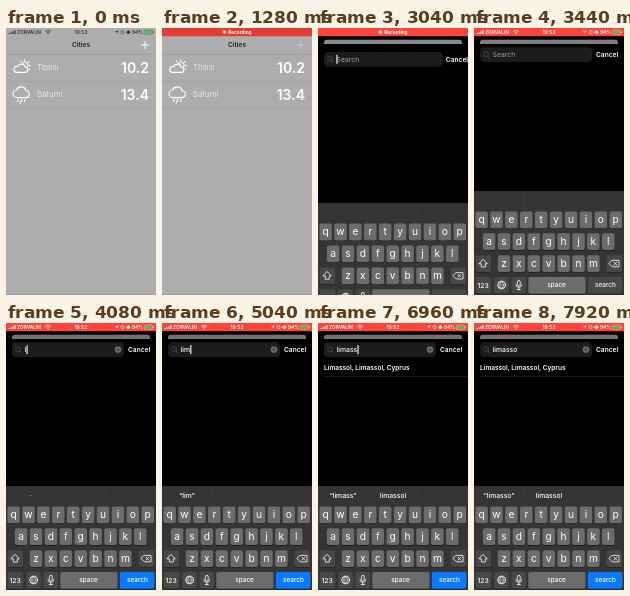
Recreate the animation shown at these times as an HTML page. Size 150 px wide and 267 px high, loop 8000 ms.

```html
<!DOCTYPE html>
<html lang="en">
<head>
<meta charset="utf-8">
<title>City search</title>
<style>
html, body { margin: 0; width: 100%; height: 100%; overflow: hidden; background: #000; }
svg { display: block; width: 100vw; height: 100vh; font: 500 6.8px Inter, Roboto, sans-serif; fill: #fff; }
.line { fill: none; stroke: #fff; stroke-linecap: round; stroke-linejoin: round; }
.mid { text-anchor: middle; }
.end { text-anchor: end; }
.city { font-size: 8px; font-weight: 300; fill: #f2f2f2; }
.temp { font-size: 14px; font-weight: 600; text-anchor: end; }
.rule { fill: #999; }
.small { font-size: 5px; font-weight: 600; }
.key { font-size: 10.2px; font-weight: 400; text-anchor: middle; }

#page, #paper, #dim, #plus, #sheet, #top, #field, #side, #keys, #red, #rec, #info {
  animation: 8s linear infinite;
}
#page { animation-name: recede; }
#paper { animation-name: corners; }
#dim { animation-name: corners, dim; }
#plus { animation-name: press; }
#sheet { animation-name: rise; }
#top { animation-name: lift; }
#field { animation-name: shrink; }
#side { animation-name: enter; }
#keys { animation-name: keys; }
#red { animation-name: red; animation-timing-function: step-end; }
#rec { animation-name: rec; animation-timing-function: step-end; }
#info { animation-name: info; animation-timing-function: step-end; }

@keyframes recede {
  0%, 17% { transform: none; animation-timing-function: cubic-bezier(.2,.8,.2,1); }
  24%, 100% { transform: translate(6px, 11.5px) scale(.92); }
}
@keyframes corners { 0%, 17% { rx: 0; } 20%, 100% { rx: 4px; } }
@keyframes dim { 0%, 17% { opacity: 0; } 24%, 32% { opacity: .12; } 48%, 100% { opacity: .34; } }
@keyframes press { 0%, 14% { opacity: 1; } 15%, 100% { opacity: .35; } }
@keyframes rise {
  0%, 17% { transform: translateY(253px); animation-timing-function: cubic-bezier(.2,.8,.2,1); }
  24%, 100% { transform: none; }
}
@keyframes lift {
  0%, 35% { transform: none; animation-timing-function: cubic-bezier(.33,.67,.67,1); }
  40.9%, 100% { transform: translateY(-19.4px); }
}
@keyframes shrink {
  0%, 35% { width: 138px; animation-timing-function: cubic-bezier(.33,.67,.67,1); }
  40.9%, 100% { width: 112px; }
}
@keyframes enter {
  0%, 35% { transform: translateX(50px); animation-timing-function: cubic-bezier(.33,1,.67,1); }
  40.9%, 100% { transform: none; }
}
@keyframes keys {
  0%, 35% { transform: translateY(104px); animation-timing-function: cubic-bezier(.33,1,.67,1); }
  40.9%, 100% { transform: none; }
}
@keyframes red { 0% { opacity: 0; fill: #e43c32; } 7% { opacity: 1; fill: #e43c32; } 20%, 100% { opacity: 1; fill: #ff453a; } }
@keyframes rec { 0% { opacity: 0; } 7% { opacity: 1; } 43%, 100% { opacity: 0; } }
@keyframes info { 0% { opacity: 1; color: #333; } 7% { opacity: 0; color: #fff; } 43%, 100% { opacity: 1; color: #fff; } }
</style>
</head>
<body>
<svg viewBox="0 0 150 267">
  <rect width="150" height="267" fill="#000"/>

  <g id="page">
    <rect id="paper" width="150" height="267" fill="#adadad"/>
    <text class="mid" x="75" y="19.4" font-weight="600" font-size="6.6" fill="#222">Cities</text>
    <path id="plus" class="line" d="M135.5 17h7M139 13.5v7"/>
    <rect class="rule" y="26" width="150" height=".6"/>
    <rect class="rule" y="52.8" width="150" height=".6"/>
    <rect class="rule" y="79.6" width="150" height=".6"/>
    <rect class="rule" y="266.2" width="150" height=".8"/>
    <g class="line" stroke-width="1.1">
      <path d="M10 44.4h9a2.6 2.6 0 0 0 .3-5.2A4 4 0 0 0 11.7 38.6A2.9 2.9 0 0 0 10 44.4z"/>
      <path d="M16.4 35.6a3 3 0 0 1 5.2 3.2M18.6 32.4v-.5M22.4 34l.6-.6M23.6 37.6h.8M15 33.7l-.5-.6M23 41l.5.4"/>
      <path d="M11 69.6h8.6a3.4 3.4 0 0 0 .5-6.8A5 5 0 0 0 10.6 62A3.8 3.8 0 0 0 11 69.6z"/>
      <path d="M12.4 71.6l-1 1.8M16 71.6l-2 3.6M19.4 71.6l-1 1.8"/>
    </g>
    <text class="city" x="31" y="42.4">Tbilisi</text>
    <text class="temp" x="143" y="45">10.2</text>
    <text class="city" x="31" y="69.2">Batumi</text>
    <text class="temp" x="143" y="71.8">13.4</text>
    <rect id="dim" width="150" height="267" fill="#000"/>
  </g>

  <g id="sheet">
    <path d="M0 267V19a3 3 0 0 1 3-3h144a3 3 0 0 1 3 3v248z" fill="#000"/>
    <g id="top">
      <rect id="field" x="6" y="38.7" width="138" height="14.6" rx="4" fill="#1c1c1e"/>
      <path class="line" d="M14 47.6l1.8 1.9M14.5 45.6a2.4 2.4 0 1 1-4.8 0a2.4 2.4 0 1 1 4.8 0z" stroke-width=".7" style="stroke:#525256"/>
      <text id="hint" x="18.6" y="48.5" font-weight="400" fill="#a0a0a4">Search</text>
      <text id="query" x="18.6" y="48.5"></text>
      <rect id="caret" y="41.6" width="1.1" height="9"/>
      <g id="clear">
        <circle cx="112" cy="46" r="3.3" fill="#6c6c70"/>
        <path d="M110.8 44.8l2.4 2.4M113.2 44.8l-2.4 2.4" stroke="#1c1c1e" stroke-width=".7"/>
      </g>
      <text id="side" x="122" y="48.5" font-size="6.6" font-weight="600">Cancel</text>
    </g>
    <text id="result" x="6" y="47.2" font-weight="600" font-size="6.5"></text>
    <rect id="under" x="6" y="53" width="144" height=".5" fill="#2a2a2c"/>
  </g>

  <g id="keys">
    <rect y="163" width="150" height="104" fill="#353535"/>
    <path d="M50 167v10M99.5 167v10" stroke="#484848" stroke-width=".5"/>
    <text id="tip0" class="mid" x="25" y="175"></text>
    <text id="tip1" class="mid" x="75" y="175"></text>
    <text id="tip2" class="mid" x="124.5" y="175"></text>
    <g id="caps"></g>
    <g class="line" stroke-width=".8">
      <path d="M9.3 231.6l4 4.2h-2v3.2h-4v-3.2h-2z"/>
      <path d="M138.4 232.4h6.6v6.4h-6.6l-3.2-3.2zM140 234.2l2.8 2.8M142.8 234.2l-2.8 2.8"/>
      <circle cx="27.6" cy="257" r="3.9"/>
      <path d="M23.7 257h7.8M27.6 253.1c-2.4 2-2.4 5.8 0 7.8c2.4-2 2.4-5.8 0-7.8M24.8 254.7h5.6M24.8 259.3h5.6" stroke-width=".5"/>
      <path d="M42 256.6a2.8 2.8 0 0 0 5.6 0M44.8 259.6v2M43.2 261.6h3.2"/>
      <rect x="43.4" y="252.4" width="2.8" height="5.6" rx="1.4"/>
    </g>
    <text class="mid" x="9.2" y="259.6">123</text>
    <text class="mid" x="82.6" y="259.4" font-size="6.4">space</text>
    <text class="mid" x="131.4" y="259.4" font-size="6.4">search</text>
  </g>

  <rect id="red" width="150" height="8.2"/>
  <g id="rec">
    <circle cx="62.4" cy="4.1" r="1.8" fill="none" stroke="#fff" stroke-width=".5"/>
    <circle cx="62.4" cy="4.1" r="1.1"/>
    <text x="66.2" y="5.9" font-size="4.7" font-weight="700">Recording</text>
  </g>
  <g id="info" class="small" fill="currentColor">
    <path d="M2.6 5h1.2v1h-1.2zM4.5 4.2h1.2v1.8h-1.2zM6.4 3.3h1.2v2.7h-1.2zM8.3 2.3h1.2v3.7h-1.2z"/>
    <text x="11" y="5.8" font-size="4.8">ZORVALIN</text>
    <path d="M39.4 3.4a4 4 0 0 1 5.4 0M40.6 4.7a2.2 2.2 0 0 1 3 0" fill="none" stroke="currentColor" stroke-width=".8"/>
    <circle cx="42.1" cy="5.8" r=".6"/>
    <text class="mid" x="75" y="5.9">19:52</text>
    <path d="M112.6 2.2l-3.8 1.9h1.9v1.9z"/>
    <circle cx="116.6" cy="4.2" r="1.6" fill="none" stroke="currentColor" stroke-width=".6"/>
    <circle cx="122.4" cy="4.2" r="1.8"/>
    <text class="end" x="137" y="5.9" font-size="4.8">94%</text>
    <rect x="138.3" y="2.2" width="8.4" height="4" rx="1.1" fill="none" stroke="currentColor" stroke-width=".4"/>
    <rect x="138.9" y="2.8" width="7" height="2.8" rx=".6" fill="#34c759"/>
    <rect x="147.1" y="3.5" width=".6" height="1.4"/>
  </g>
</svg>
<script>
const el = id => document.getElementById(id);
const caps = el('caps');

function add(tag, attrs, text = '') {
  const node = document.createElementNS('http://www.w3.org/2000/svg', tag);
  for (const name in attrs) node.setAttribute(name, attrs[name]);
  node.textContent = text;
  caps.append(node);
  return node;
}

function cap(x, y, width, fill) {
  add('rect', { x, y: y + .6, width, height: 16.8, rx: 2, fill: '#1a1a1a' });
  return add('rect', { x, y, width, height: 16.8, rx: 2, fill });
}

const LIGHT = '#6c6c6c', DARK = '#484848', BLUE = '#0a7aff';
['qwertyuiop', 'asdfghjkl', 'zxcvbnm'].forEach((row, r) => {
  const left = [1.3, 8.8, 23.7][r], y = 183.4 + r * 21.9;
  [...row].forEach((letter, i) => {
    const x = left + i * 14.9;
    cap(x, y, 12.6, LIGHT);
    add('text', { class: 'key', x: x + 6.3, y: y + 11.6 }, letter);
  });
});
cap(1.3, 227.2, 16, DARK);
cap(132.4, 227.2, 16, DARK);
cap(1.3, 249, 16.2, DARK);
cap(20, 249, 15.2, DARK);
cap(37.2, 249, 15.2, DARK);
cap(54.2, 249, 57.4, LIGHT);
const searchKey = cap(113.8, 249, 34.8, DARK);

const LIMA = 'Lima, Lima, Peru', LIMASSOL = 'Limassol, Limassol, Cyprus';
// start time, query, result, suggestions
const steps = [
  [0, '', ''],
  [4000, 'l', '', '·'],
  [4480, 'li', '', '“li”'],
  [4880, 'lim', '', '“lim”'],
  [5280, 'lima', LIMA, '“lima”'],
  [5760, 'limas', LIMA, '“limas”', 'unas', 'unas'],
  [6560, 'limass', LIMASSOL, '“limass”', 'limassol'],
  [7200, 'limasso', LIMASSOL, '“limasso”', 'limassol']
];
const FOCUS = 2800;
const show = (id, on) => el(id).setAttribute('visibility', on ? 'visible' : 'hidden');
let last;

function draw(now) {
  const t = now % 8000;
  const step = steps.filter(s => s[0] <= t).pop();
  if (step !== last) {
    const [, query, result, ...tips] = last = step;
    el('query').textContent = query;
    el('result').textContent = result;
    for (let i = 0; i < 3; i++) el('tip' + i).textContent = tips[i] || '';
    el('caret').setAttribute('x', 18.4 + (query ? el('query').getComputedTextLength() + .4 : 0));
    searchKey.setAttribute('fill', query ? BLUE : DARK);
    show('hint', !query);
    show('clear', query);
    show('under', result);
  }
  // the caret stays lit after each key press, then blinks
  const idle = t - Math.max(step[0], FOCUS);
  show('caret', idle >= 0 && idle % 1000 < 600);
}

const start = performance.now();
function tick() {
  draw(performance.now() - start);
  requestAnimationFrame(tick);
}
tick();
</script>
</body>
</html>
```
